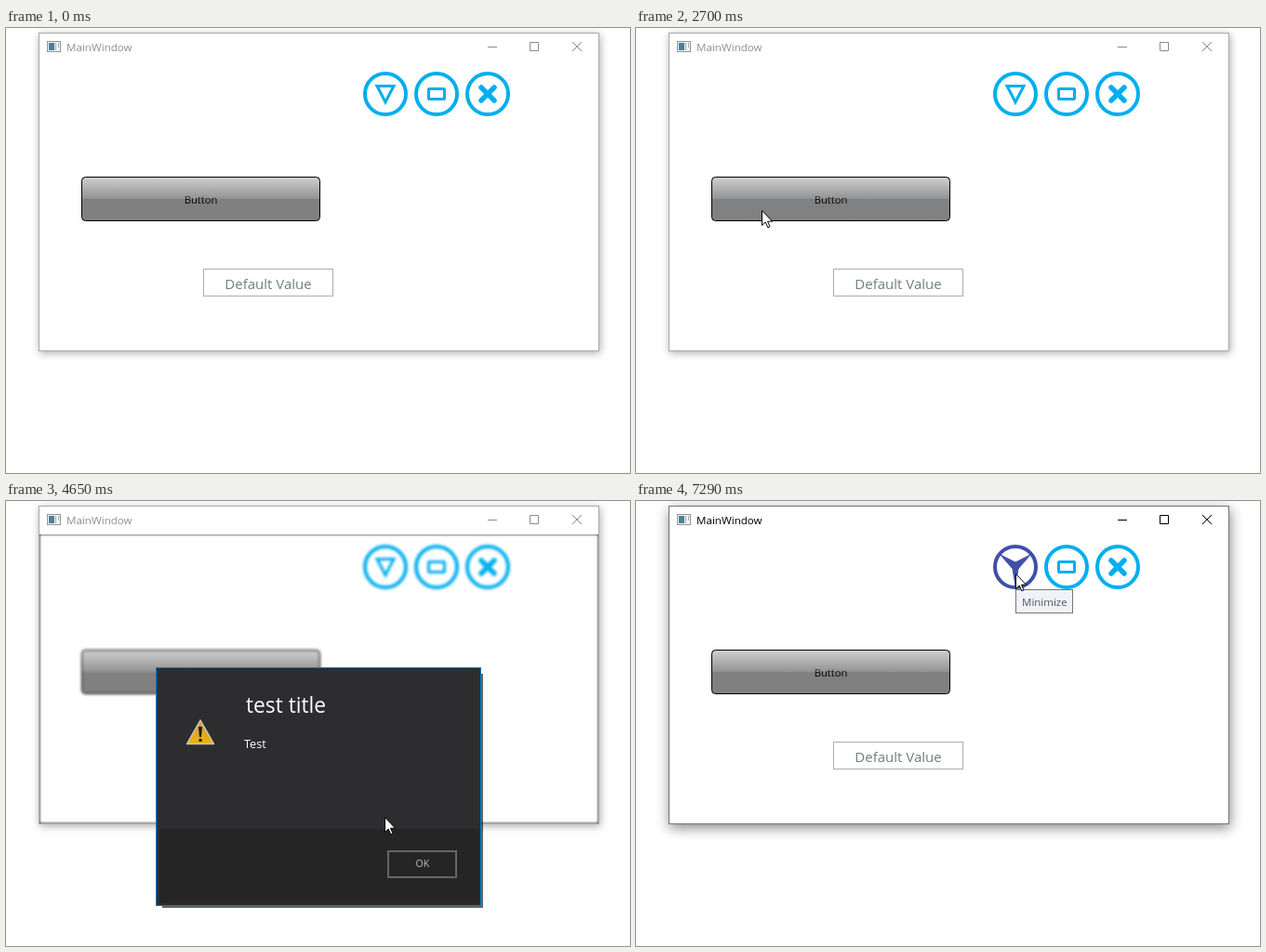
Recreate the animation shown at these times as an HTML page. Size 671x479 px, loop 8 s.

```html
<!DOCTYPE html>
<html lang="en">
<head>
<meta charset="utf-8">
<title>Window demo</title>
<style>
  html, body { margin: 0; width: 100%; height: 100%; overflow: hidden; background: #fff; }
  svg { display: block; width: 100%; height: 100%; font-family: "Open Sans", "Noto Sans", sans-serif; }
  #frame { fill: #fff; stroke: #aaa; filter: drop-shadow(1px 2px 4px #0005); }
  #titleBar { fill: #8a9296; --chrome: #8c8c8c; }
  .active #frame { stroke: #737373; filter: drop-shadow(1px 4px 7px #0007); }
  .active #titleBar { fill: #000; --chrome: #000; }
  #chrome { fill: none; stroke: var(--chrome); }
  #backing, #dialog { display: none; }
  .modal #backing, .modal #dialog { display: inline; }
  .modal #client { filter: blur(1.6px); }
  #shadow { fill: none; stroke: #0009; stroke-width: 2; filter: blur(.6px); }
  .icon { fill: none; stroke: #00aeef; }
</style>
</head>
<body>
<svg id="stage" viewBox="0 0 671 479">
  <defs>
    <linearGradient id="gloss" x2="0" y2="1">
      <stop stop-color="#fff" stop-opacity=".62"/>
      <stop offset="1" stop-color="#fff" stop-opacity=".14"/>
    </linearGradient>
    <radialGradient id="halo" gradientUnits="userSpaceOnUse" r="1"
      gradientTransform="translate(209 209) scale(150 54)">
      <stop stop-color="#80a8e4"/>
      <stop offset=".5" stop-color="#80a4dc" stop-opacity=".65"/>
      <stop offset="1" stop-color="#809cc8" stop-opacity=".4"/>
    </radialGradient>
    <linearGradient id="amber" x2="0" y2="1">
      <stop stop-color="#c99a50"/>
      <stop offset="1" stop-color="#f0b400"/>
    </linearGradient>
    <clipPath id="clientClip"><path d="M36 36H637V347H36Z"/></clipPath>
  </defs>

  <rect id="frame" x="35.5" y="5.5" width="602" height="342"/>
  <g id="titleBar">
    <rect x="44.5" y="14.5" width="14" height="11" fill="#f4f6f7" stroke="#8c959a"/>
    <rect x="46" y="16" width="6" height="8" fill="#4d8096"/>
    <path d="M53.5 16V24M56.5 16V21" stroke="#a6aaad"/>
    <text x="65" y="25" font-size="11.6">MainWindow</text>
    <path id="chrome" d="M518 20.5H528M563.5 15.5H572.5V24.5H563.5ZM609 15L619 25M619 15L609 25"/>
  </g>

  <g clip-path="url(#clientClip)">
    <path id="backing" d="M36 36H637V347H36Z"/>
    <g id="client">
      <path d="M36 36H637V347H36Z" fill="#fff"/>
      <g class="icon" id="minimize" transform="translate(408 71)">
        <circle r="22" stroke-width="4"/>
        <path id="glyph"/>
      </g>
      <g class="icon" stroke-width="4">
        <circle cx="463" cy="71" r="22"/>
        <rect x="454.5" y="65.5" width="17" height="11" rx=".5" stroke-width="3"/>
        <circle cx="518" cy="71" r="22"/>
        <path d="M511 64L525 78M525 64L511 78" stroke-width="5.5" stroke-linecap="round"/>
      </g>
      <rect x="81.5" y="160.5" width="256" height="47" rx="4" fill="#808080"/>
      <rect id="glow" x="81.5" y="160.5" width="256" height="47" rx="4" fill="url(#halo)"/>
      <text x="209.5" y="189" font-size="11.2" text-anchor="middle">Button</text>
      <path d="M82 184V165Q82 161 86 161H333Q337 161 337 165V184Z" fill="url(#gloss)"/>
      <rect x="81.5" y="160.5" width="256" height="47" rx="4" fill="none" stroke="#000"/>
      <rect x="212.5" y="259.5" width="139" height="29" fill="#fff" stroke="#abadb3"/>
      <text x="282" y="281" font-size="15" text-anchor="middle" fill="#6f7f80">Default Value</text>
    </g>
  </g>

  <g id="dialog">
    <path id="shadow"/>
    <rect id="panel" x="161.5" y="179.5" width="349" fill="#2d2d30"/>
    <text x="258" y="228" font-size="22.8" fill="#fff">test title</text>
    <path d="M209 236L223.5 261.5H194.5Z" fill="url(#amber)" stroke="#ccc6b4" stroke-width="1.5" stroke-linejoin="round"/>
    <path d="M207 243H211L210 254H208ZM207.5 256H210.5V259H207.5Z" fill="#1c1a14"/>
    <text x="256" y="266" font-size="12.6" fill="#fff">Test</text>
    <g id="footer">
      <rect x="162" width="348" height="83" fill="#2d2d30"/>
      <rect x="165" width="344" height="80" fill="#252526"/>
      <rect id="ok" x="411" y="24" width="73" height="28" stroke="#666" stroke-width="2"/>
      <text x="448" y="41" font-size="10.6" text-anchor="middle" fill="#bbb">OK</text>
    </g>
    <rect id="outline" x="161.5" y="179.5" width="349" fill="none" stroke="#007acc"/>
  </g>

  <g id="tooltip">
    <rect x="408.5" y="95.5" width="61" height="25" fill="#f1f2f8" stroke="#767676"/>
    <text x="415" y="113" font-size="11.5" fill="#575757">Minimize</text>
  </g>
  <path id="cursor" d="M.5 .5V16.5L4.2 13L6.8 18.8L9 17.8L6.5 12.2H11.5Z" fill="#fff" stroke="#000"/>
</svg>

<script>
const LOOP = 8000;
const STEP = 77; // ms between picture changes while something moves
const burstStarts = [360, 2320, 3480, 4270, 6290];

const el = id => document.getElementById(id);
const set = (id, attrs) => {
  for (const name in attrs) el(id).setAttribute(name, attrs[name]);
};
const mix = (a, b, p) => a + (b - a) * p;
const ramp = (t, a, b) => Math.min(1, Math.max(0, (t - a) / (b - a)));
const easeOut = (p, power) => 1 - (1 - p) ** power;

// Each stroke of the pointer: begin, end, and where its tip arrives.
const strokes = [
  { begin: 340, end: 750, to: [190, 194] },
  { begin: 2300, end: 2475, to: [184, 235] },
  { begin: 2475, end: 2860, to: [126, 182] },
  { begin: 4190, end: 4960, to: [459, 393] },
  { begin: 6210, end: 6990, to: [408, 78] }
];

function pointerAt(t) {
  let [x, y] = [520, 460];
  for (const { begin, end, to } of strokes) {
    const p = ramp(t, begin, end);
    x = mix(x, to[0], easeOut(p, 2));
    y = mix(y, to[1], easeOut(p, 1.5));
  }
  return [Math.round(x), Math.round(y)];
}

// Hold the picture between changes, counted from the latest burst.
function snap(t) {
  const start = burstStarts.filter(s => s <= t).pop() ?? 0;
  return start + STEP * Math.floor((t - start) / STEP + .12);
}

const glowAt = t =>
  ramp(t, 750, 1050) - ramp(t, 2400, 2690) + ramp(t, 2690, 2940) - ramp(t, 3600, 3711);

function drawDialog(t, pressed) {
  const growth = ramp(t, 3480, 3711);
  const height = 256 * growth ** 1.25;
  const shadowBottom = 180 + height + (growth < 1 ? 17 : 1);
  el("dialog").style.visibility = growth ? "visible" : "hidden";
  set("shadow", { d: `M168 ${shadowBottom}H512V186` });
  set("panel", { height });
  set("outline", { height });
  set("footer", { transform: `translate(0 ${Math.round(97 + height)})` });
  set("ok", { fill: pressed ? "#3f3f46" : "#252526" });
}

// The triangle stretches into a three-pointed star; its right half is mirrored.
function drawMinimize(t) {
  const hover = ramp(t, 6800, 7000), morph = ramp(t, 7020, 7290);
  const half = [
    [0, mix(-8.5, -5, morph)],
    [mix(9, 16, morph), mix(-8.5, -13, morph)],
    [mix(4.5, 3, morph), mix(0, 2, morph)],
    [0, mix(9, 20, morph)]
  ];
  const mirrored = half.slice(1, 3).reverse().map(([x, y]) => [-x, y]);
  const paint = `rgb(${mix(0, 64, hover)},${mix(174, 80, hover)},${mix(239, 168, hover)})`;
  el("minimize").style.stroke = paint;
  set("glyph", {
    d: `M${[...half, ...mirrored].join("L")}Z`,
    fill: paint,
    "fill-opacity": morph,
    "stroke-width": mix(3, 1, morph)
  });
}

function draw(time) {
  const t = snap(time);
  const modal = time >= 3480 && time < 5970;
  const active = time >= 3330 && !modal;
  el("stage").setAttribute("class", modal ? "modal" : active ? "active" : "");
  set("glow", { opacity: glowAt(t) });
  drawDialog(t, time >= 5740);
  drawMinimize(t);
  set("tooltip", { opacity: ramp(t, 7060, 7290) });
  set("cursor", { transform: `translate(${pointerAt(t)})`, opacity: time < 360 ? 0 : 1 });
}

const begin = performance.now();
function tick() {
  draw((performance.now() - begin) % LOOP);
  requestAnimationFrame(tick);
}
tick();
</script>
</body>
</html>
```
